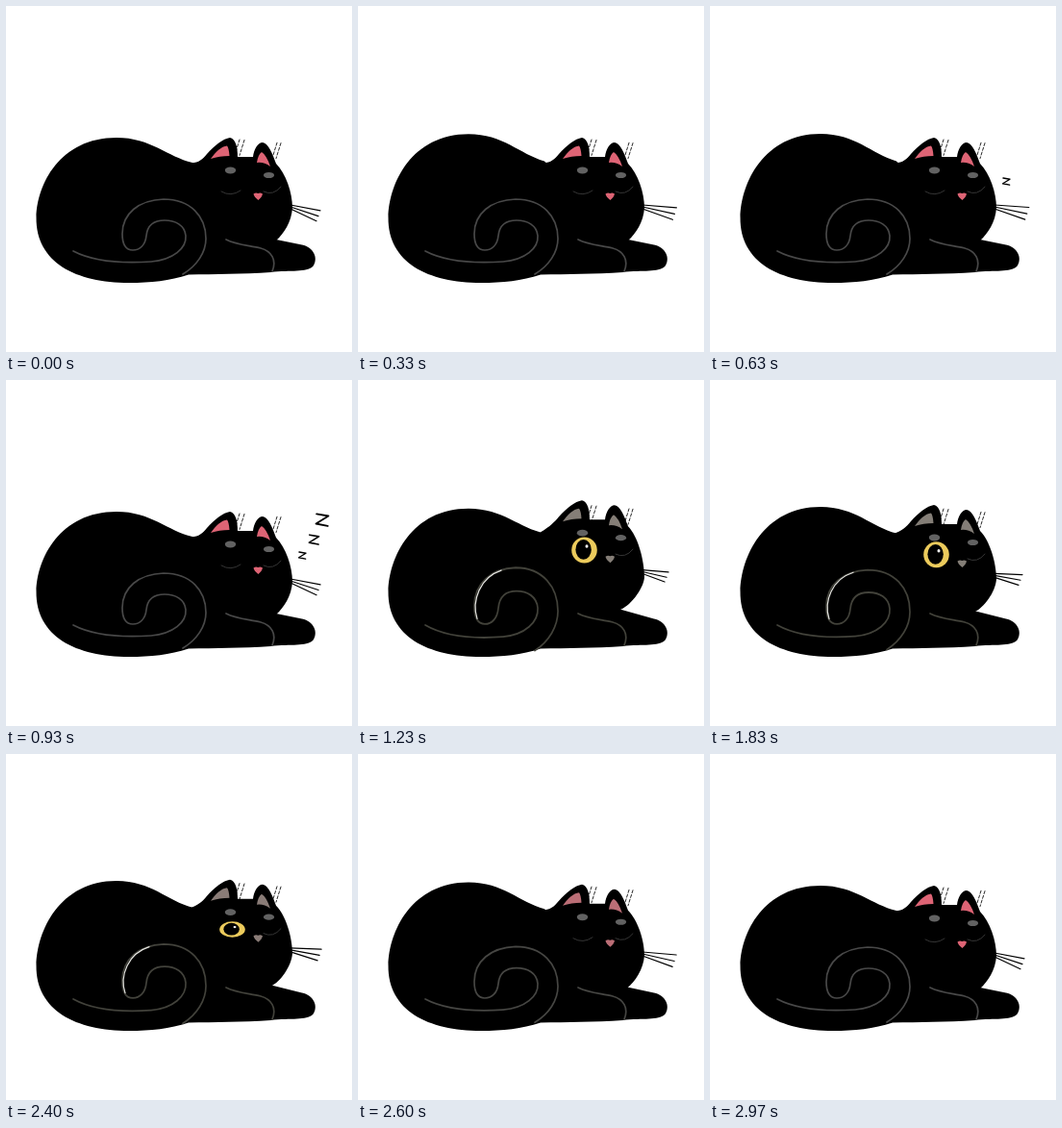
Animation, 360 px wide and 360 px high, one loop 3.01 s. Source, as an HTML page with a canvas:

```html
<!DOCTYPE html>
<html>
<head>
<meta charset="utf-8">
<style>
html, body { margin: 0; width: 100%; height: 100%; overflow: hidden; background: #fff; }
canvas { display: block; width: 360px; height: 360px; }
</style>
</head>
<body>
<canvas id="stage" width="360" height="360"></canvas>
<script>
const ctx = document.getElementById('stage').getContext('2d');
const LOOP = 3010;
const WAKE = 1110;
const DOZE = 2330;

// Smooth rise from 0 to 1 between two times.
function ramp(t, from, to) {
  const u = Math.min(1, Math.max(0, (t - from) / (to - from)));
  return u * u * (3 - 2 * u);
}

function pose(t) {
  const jump = ramp(t, WAKE, WAKE + 130);
  return {
    breath: ramp(t, 0, 500) - ramp(t, 500, 960) + ramp(t, 960, 1400) - ramp(t, DOZE + 70, 2950),
    lift: 12 * jump - 5 * ramp(t, WAKE + 130, 1400) - 7 * ramp(t, DOZE, 2700),
    open: ramp(t, WAKE + 20, WAKE + 120) - ramp(t, DOZE + 20, DOZE + 140),
    grey: jump - ramp(t, DOZE, 2800)
  };
}

function mix(a, b, u) {
  return 'rgb(' + a.map((v, i) => Math.round(v + (b[i] - v) * u)).join(',') + ')';
}

function stroke(path, color, width) {
  ctx.strokeStyle = color;
  ctx.lineWidth = width;
  ctx.stroke(new Path2D(path));
}

function fill(path, color) {
  ctx.fillStyle = color;
  ctx.fill(new Path2D(path));
}

function oval(x, y, rx, ry, color) {
  ctx.fillStyle = color;
  ctx.beginPath();
  ctx.ellipse(x, y, rx, ry, 0, 0, Math.PI * 2);
  ctx.fill();
}

function drawBody({ breath, lift }) {
  const top = 137 - 5 * breath;
  const neck = 281 - lift * 0.8;
  fill(`M31.5 220 C32 ${186 - 2 * breath} 56 ${top} 115 ${top}
    C151 ${top} 168 ${157 - 4 * breath} 194 ${163 - 2 * breath - lift * 0.2}
    L225 190 L270 220 L${neck} ${243 - lift * 0.4}
    L308 248.5 C320 251 325 262 320 270 C315 277 300 275 279 276.5
    L276 277 C245 279 218 279 190 279.5
    C170 286 151 288 128 288 C73 288 31 267 31.5 220 Z`, '#000');
}

function drawHead({ lift }) {
  const y = v => v - lift;
  fill(`M190 ${163 - lift * 0.4} C200 ${y(164)} 204 ${y(160)} 209 ${y(154)}
    C217 ${y(145)} 226 ${y(138)} 233 ${y(137)}
    C239 ${y(138)} 241 ${y(147)} 241 ${y(157)} L257 ${y(157)}
    C258 ${y(149)} 262 ${y(142)} 267 ${y(142)}
    C273 ${y(143)} 277 ${y(153)} 281 ${y(164)}
    C291 ${y(174)} 298 ${194 - lift * 0.6} 298 ${210 - lift * 0.4}
    C297 ${225 - lift * 0.6} ${289 - lift * 0.6} 237 ${281 - lift * 0.8} ${244 - lift * 0.4}
    L215 235 Z`, '#000');
}

function drawEye(open) {
  ctx.save();
  ctx.translate(235.5, 188.8);
  ctx.scale(1, open);
  oval(0, 0, 13.3, 13.5, '#eccb5c');
  oval(-0.9, -0.5, 8.2, 10.4, '#000');
  oval(2.5, -4, 1.5, 1.8, '#fff');
  ctx.restore();
}

function drawFace({ lift, open, grey }) {
  ctx.save();
  ctx.translate(0, -lift);
  const pink = mix([222, 100, 117], [132, 126, 119], grey);
  fill('M213 159 C218 152 224 146 230 145.5 Q232 148 232.5 156 Q222 156 213 159Z', pink);
  fill('M261 163 Q262 155 266 152 Q271 155 275 167 Q268 162 261 163Z', pink);
  oval(233.5, 171, 5.7, 3.4, '#626262');
  oval(273.5, 176, 5.6, 3.1, '#626262');
  fill('M257.5 195.5 Q260 193.8 262.3 195 Q264.5 193.8 267 195.5 Q266.5 198.5 262.5 202 Q258 198.5 257.5 195.5Z', pink);
  stroke('M268 193 Q278 198 286 188', '#353535', 1);
  if (open < 0.5) stroke('M224 193 Q234 199 244 192', '#353535', 1);
  if (open > 0.02) drawEye(open);
  ctx.restore();
}

function drawWhiskers({ breath, lift, open }) {
  const len = 31 + 6 * breath - 8 * open;
  for (let i = 0; i < 3; i++) {
    const slope = 0.19 + 0.14 * i - 0.15 * breath;
    const n = len - i * 2;
    const y = 207 - lift * 0.8 + i * 2;
    stroke(`M296 ${y} L${296 + n} ${y + n * slope}`, '#000', 1.2);
  }
  ctx.setLineDash([3, 2]);
  for (const x of [243, 248, 282, 286]) {
    const y = 139 + (x - 243) / 12 - lift * 0.7;
    stroke(`M${x} ${y} l-5 16`, '#111', 0.9);
  }
  ctx.setLineDash([]);
}

function drawTail({ lift, grey }) {
  const tone = mix([72, 72, 72], [66, 66, 58], grey);
  ctx.save();
  // The curl stretches upward from its base.
  ctx.translate(0, 255);
  ctx.scale(1, 1 + lift * 0.009);
  ctx.translate(0, -255);
  stroke(`M70 255 C91 266 121 268 151 266 C174 264 188 252 187 239
    C186 228 176 223 165 223 C153 223 147 229 146 239
    C145 249 139 254 132 254 C124 254 121 247 121 237
    C121 216 138 202 164 201 C192 201 208 219 208 242
    C208 256 199 270 184 279`, tone, 1.7);
  if (grey > 0.8) stroke('M124 249 C118 232 127 210 149 203.5', '#e4e4e0', 1.2);
  ctx.restore();
  stroke('M229 243 C241 249 253 249 265 252 C276 255 282 264 277 276', tone, 1.7);
}

function drawZ(x, y, size) {
  stroke(`M${x - size} ${y - size} l${2 * size} ${size * 0.35}
    l${-2.1 * size} ${size * 1.3} l${2 * size} ${size * 0.4}`, '#000', 0.7 + size * 0.2);
}

function draw(t) {
  const p = pose(t);
  ctx.fillStyle = '#fff';
  ctx.fillRect(0, 0, 360, 360);
  ctx.lineCap = ctx.lineJoin = 'round';
  drawWhiskers(p);
  drawBody(p);
  drawHead(p);
  drawFace(p);
  drawTail(p);
  for (let i = 0; i < 3; i++) {
    if (t >= 630 + 130 * i && t < WAKE + 20) {
      drawZ(308.5 + 14 * i - 1.8 * i * i, 182.5 - 14.5 * i - 2 * i * i, 3.5 + 1.3 * i);
    }
  }
}

const start = performance.now();
function tick() {
  draw((performance.now() - start) % LOOP);
  requestAnimationFrame(tick);
}
tick();
</script>
</body>
</html>
```
